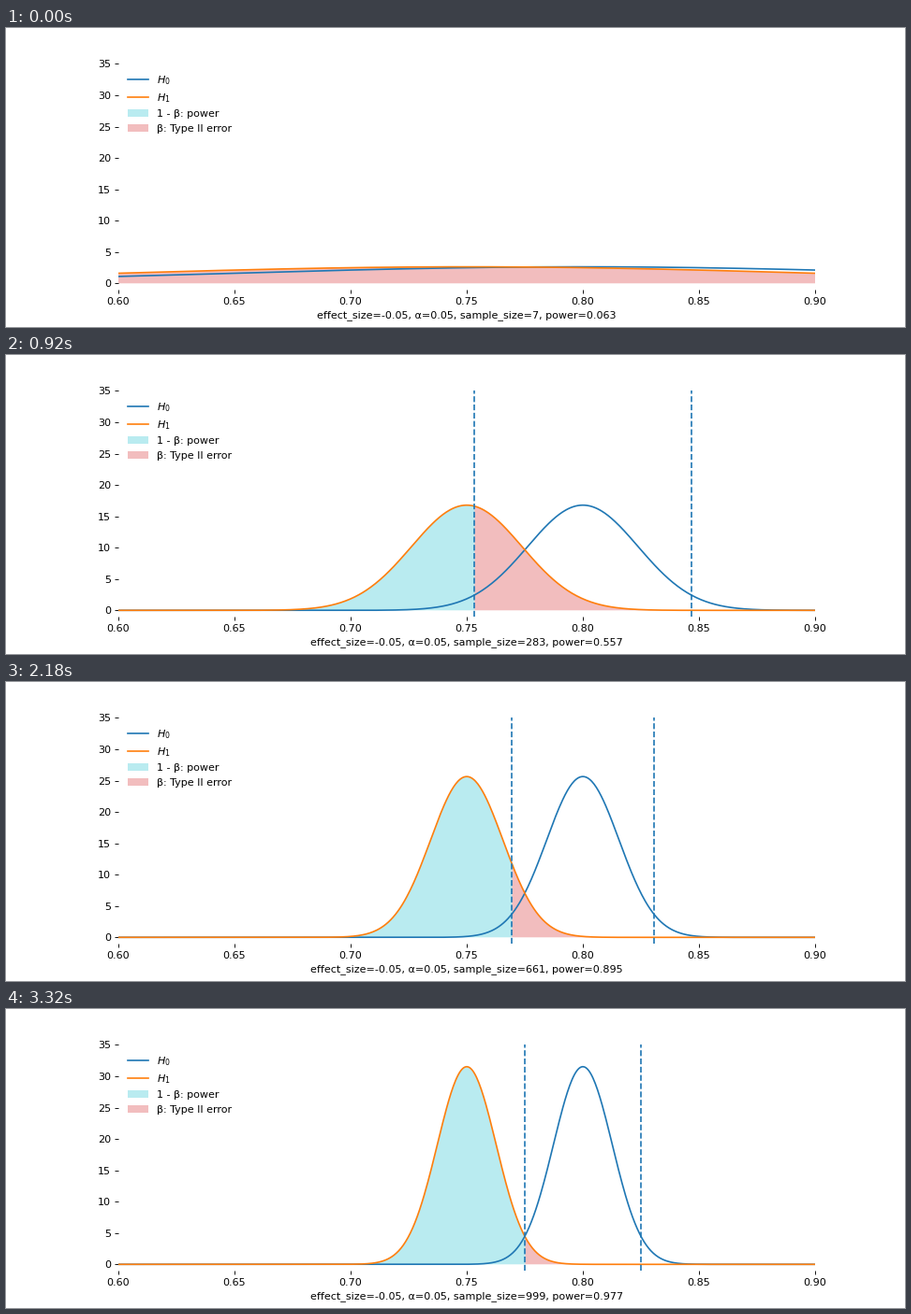
Animation of 960 by 320 pixels, one loop 3340 ms. Source, as a matplotlib script:

```python
import math

import numpy as np
import matplotlib.pyplot as plt
from matplotlib.animation import FuncAnimation
from matplotlib.lines import Line2D
from matplotlib.patches import Rectangle

W, H, DPI = 960, 320, 80
FRAMES, INTERVAL = 167, 20
P0, EFFECT, ALPHA, Z = 0.80, -0.05, 0.05, 1.959964
P1 = P0 + EFFECT
LO, HI = 0.60, 0.90

plt.rcParams.update({"font.family": "DejaVu Sans", "font.size": 10,
                     "mathtext.fontset": "dejavusans"})

fig = plt.figure(figsize=(W / DPI, H / DPI), dpi=DPI, facecolor="white")
ax = fig.add_axes([0.125, 0.125, 0.775, 0.755])
ax.set(xlim=(LO, HI), ylim=(-1, 35),
       xticks=np.linspace(LO, HI, 7), yticks=range(0, 36, 5))
ax.xaxis.set_major_formatter("{x:.2f}")
ax.spines[:].set_visible(False)

x = np.linspace(LO, HI, 600)
h0, = ax.plot([], [], color="tab:blue", lw=1.5)
h1, = ax.plot([], [], color="tab:orange", lw=1.5)
limits = [ax.axvline(LO, color="tab:blue", ls="--", lw=1.5) for _ in range(2)]


def shade(color):
    return ax.fill([LO, LO, LO], [0, 0, 0], color=color, alpha=0.3, lw=0, zorder=1)[0]


power_left, power_right = shade("tab:cyan"), shade("tab:cyan")
beta_area = shade("tab:red")


def legend_row(label, baseline, color, patch=False):
    """Place one key and its label, in pixels from the top left."""
    y = H - baseline
    if patch:
        key = Rectangle((130, y), 22.2, 7.8, color=color, alpha=0.3, lw=0,
                        transform=None)
    else:
        key = Line2D([130, 152.2], [y + 3.9] * 2, color=color, lw=1.5,
                     transform=None)
    fig.add_artist(key)
    fig.text(161, y, label, transform=None, va="baseline")


legend_row("$H_0$", 59, "tab:blue")
legend_row("$H_1$", 78, "tab:orange")
legend_row("1 - β: power", 95, "tab:cyan", patch=True)
legend_row("β: Type II error", 111, "tab:red", patch=True)


def pdf(v, mean, sd):
    return np.exp(-0.5 * ((v - mean) / sd) ** 2) / (sd * math.sqrt(2 * math.pi))


def cdf(z):
    return 0.5 * (1 + math.erf(z / math.sqrt(2)))


def set_area(area, a, b, sd):
    a, b = np.clip([a, b], LO, HI)
    area.set_visible(b > a)
    v = np.linspace(a, b, 300)
    top = np.column_stack([v, pdf(v, P1, sd)])
    area.set_xy(np.vstack([[a, 0], top, [b, 0]]))


def update(i):
    n = min(7 + 6 * i, 999)
    sd = math.sqrt(P0 * (1 - P0) / n)
    left, right = P0 - Z * sd, P0 + Z * sd
    h0.set_data(x, pdf(x, P0, sd))
    h1.set_data(x, pdf(x, P1, sd))
    for line, pos in zip(limits, (left, right)):
        line.set_xdata([pos, pos])
    set_area(power_left, LO, left, sd)
    set_area(beta_area, left, right, sd)
    set_area(power_right, right, HI, sd)
    power = cdf((left - P1) / sd) + 1 - cdf((right - P1) / sd)
    ax.set_xlabel(f"effect_size={EFFECT}, α={ALPHA}, sample_size={n}, "
                  f"power={round(power, 3)}")
    return []


anim = FuncAnimation(fig, update, frames=FRAMES, interval=INTERVAL,
                     init_func=lambda: [], repeat=True, repeat_delay=0)
plt.show()
```
